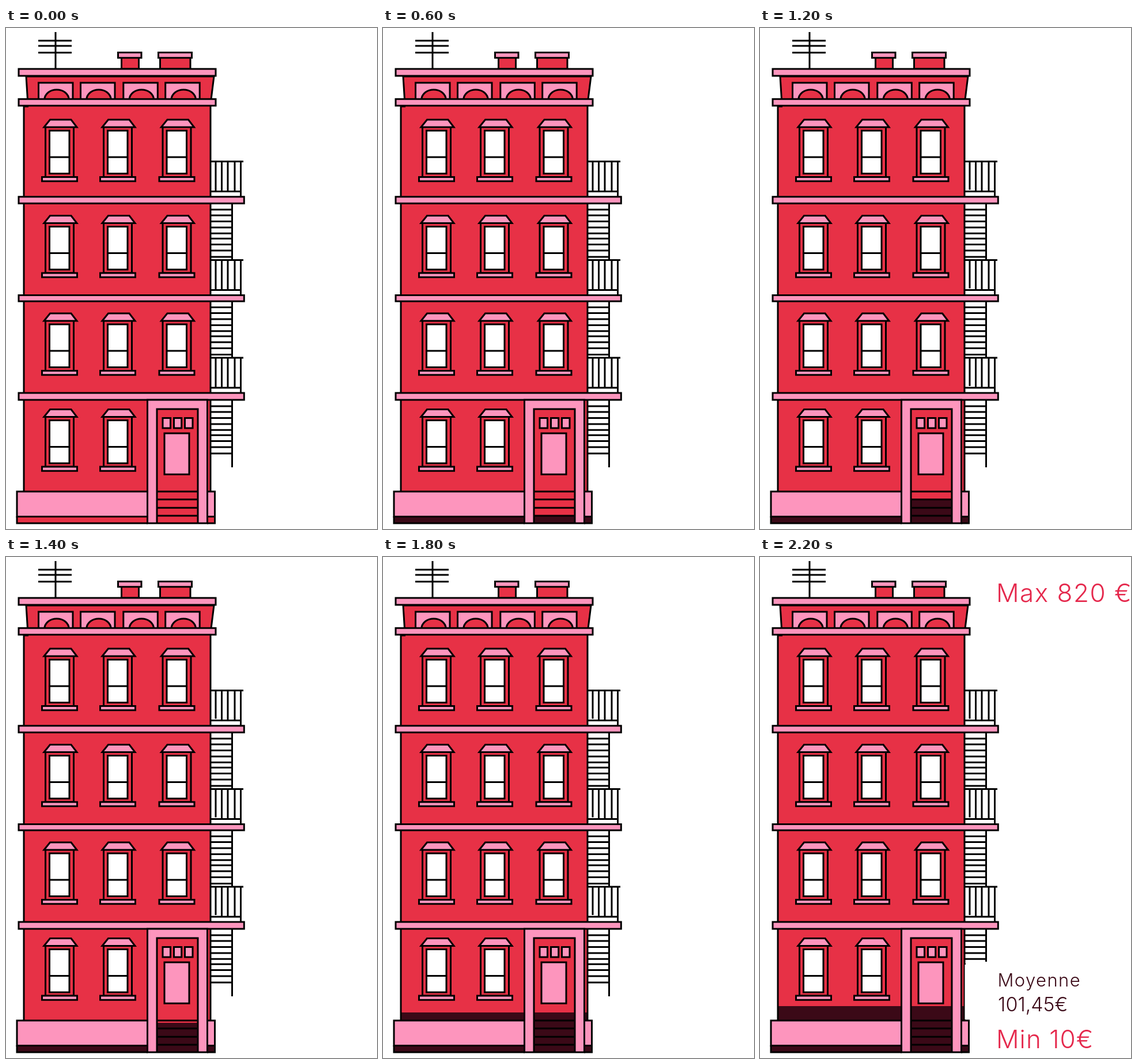
Write an HTML page that moves like this. It is 644x869 px and loops after 2400 ms.

```html
<!DOCTYPE html>
<html lang="fr">
<head>
<meta charset="utf-8">
<title>Loyer</title>
<style>
  html, body { margin: 0; width: 100%; height: 100%; overflow: hidden; background: #fff; }
  svg { display: block; }
  .ink { stroke: #000; stroke-width: 3; fill: none; }
  .red { fill: #e73146; }
  .pink { fill: #fd95bd; }
  .white { fill: #fff; }
  .dark { fill: #3b0917; }
  text { font-family: Inter, "Open Sans", sans-serif; font-weight: 300; }
  .price { font-size: 44px; fill: #e5284c; }

  .level { animation: rise 2400ms step-end infinite; }
  .gap { animation: gap 2400ms step-end infinite; }
  .labels { animation: labels 2400ms step-end infinite; }

  @keyframes rise {
    0% { transform: translateY(870px); }
    16.66% { transform: translateY(853px); }
    25% { transform: translateY(847px); }
    33.33% { transform: translateY(835px); }
    41.66% { transform: translateY(826px); }
    50% { transform: translateY(818px); }
    58.33% { transform: translateY(808px); }
    66.66% { transform: translateY(799px); }
    75% { transform: translateY(790px); }
    83.33% { transform: translateY(781.5px); }
    91.66%, 100% { transform: translateY(779px); }
  }
  @keyframes gap {
    0% { visibility: hidden; }
    8.33% { visibility: visible; }
    91.66%, 100% { visibility: hidden; }
  }
  @keyframes labels {
    0% { visibility: hidden; }
    91.66%, 100% { visibility: visible; }
  }
</style>
</head>
<body>
<svg width="644" height="869" viewBox="0 0 644 869">
  <defs>
    <path id="body" d="M31 135H355V847H362.5V859H19V847H31Z"/>
    <clipPath id="inside"><use href="#body"/></clipPath>

    <g id="window" class="ink">
      <path class="red" d="M68.5 171.5H117.5V258.5H68.5Z"/>
      <path class="pink" d="M66 172L76.5 159H113L123 172Z"/>
      <path class="white" d="M75.5 178H110V252.5H75.5Z"/>
      <path d="M75.5 224H110"/>
      <path class="pink" d="M62.5 258.5H123.5V265.7H62.5Z"/>
    </g>
    <g id="pair">
      <use href="#window"/>
      <use href="#window" x="101"/>
    </g>
    <g id="row">
      <use href="#pair"/>
      <use href="#window" x="203.5"/>
    </g>

    <g id="arch" class="ink">
      <path class="pink" d="M56.5 95H116V124H56.5Z"/>
      <path class="red" d="M66.5 125C68 101 108 101 109.5 125"/>
    </g>

    <g id="rail">
      <path class="ink" d="M355 231.5H412M355 283.5H408M364 231.5V283M374.5 231.5V283M385 231.5V283M397 231.5V283M407.5 231.5V293"/>
      <path class="white gap" d="M362 280.5H366V282H362Z"/>
    </g>
    <path id="rungs" class="ink" d="M355 315H394M355 325H394M355 335.5H394M355 346H394M355 356.3H394M355 365.3H394M355 375.5H394M355 386H394M355 397H394"/>
  </defs>

  <!-- fire escape -->
  <use href="#rail"/>
  <use href="#rail" y="171"/>
  <use href="#rail" y="340.5"/>
  <use href="#rungs"/>
  <use href="#rungs" y="169.5"/>
  <use href="#rungs" y="341"/>
  <path class="ink" d="M392.5 304V403M392.5 474V573M392.5 645V762"/>

  <!-- walls and rising level -->
  <use href="#body" class="red"/>
  <g clip-path="url(#inside)"><rect class="dark level" x="19" width="344" height="100"/></g>
  <path class="ink" d="M31 135V804M355 135V804M31 136H39"/>
  <path class="white labels" d="M357 702H396V764H357ZM355.5 707H358V802H355.5Z"/>

  <!-- roof -->
  <g class="ink">
    <path d="M86 7V71M56 22H114M56 31H114M56 42.8H114"/>
    <path class="red" d="M200.5 51H230.5V71H200.5ZM267.5 51H320V71H267.5Z"/>
    <path class="pink" d="M194.5 42.5H235V51.8H194.5ZM264.5 42.5H322.5V51.8H264.5Z"/>
    <path class="red" d="M35 84H361L356 124H37.5Z"/>
  </g>
  <use href="#arch"/>
  <use href="#arch" x="73"/>
  <use href="#arch" x="147.3"/>
  <use href="#arch" x="220.2"/>

  <!-- ledges -->
  <path class="ink pink" style="fill:#fd95bd" d="M22 71H364V83H22ZM22 123.3H364V134.8H22ZM22 292.8H413.3V304.3H22ZM22 463.5H413.3V474H22ZM22 633H413.3V645H22Z"/>

  <!-- windows -->
  <use href="#row"/>
  <use href="#row" y="166.5"/>
  <use href="#row" y="336"/>
  <use href="#pair" y="502.5"/>

  <!-- base and door -->
  <g class="ink">
    <path class="pink" d="M19 804H246V847.5H19ZM349 804H362.5V847.5H349Z"/>
    <path d="M246 859H19V847M349 859H362.5V847"/>
    <path class="pink" fill-rule="evenodd" d="M245.5 645H349.5V859H245.5ZM262 661V859H333V661Z"/>
    <path d="M262 804H333M262 817.7H333M262 832.3H333M262 846H333"/>
    <path class="pink" d="M272 676.5H285.5V694H272ZM291.5 676.5H304.7V694H291.5ZM310.5 676.5H324V694H310.5ZM275 703H318V774.3H275Z"/>
  </g>

  <g class="labels">
    <text class="price" x="410" y="78" letter-spacing="1.5">Max 820 €</text>
    <text class="dark" x="412.5" y="745" font-size="31" letter-spacing="1.4">Moyenne</text>
    <text class="dark" x="413" y="788" font-size="34">101,45€</text>
    <text class="price" x="410" y="852" letter-spacing="1">Min 10€</text>
  </g>
</svg>
</body>
</html>
```
